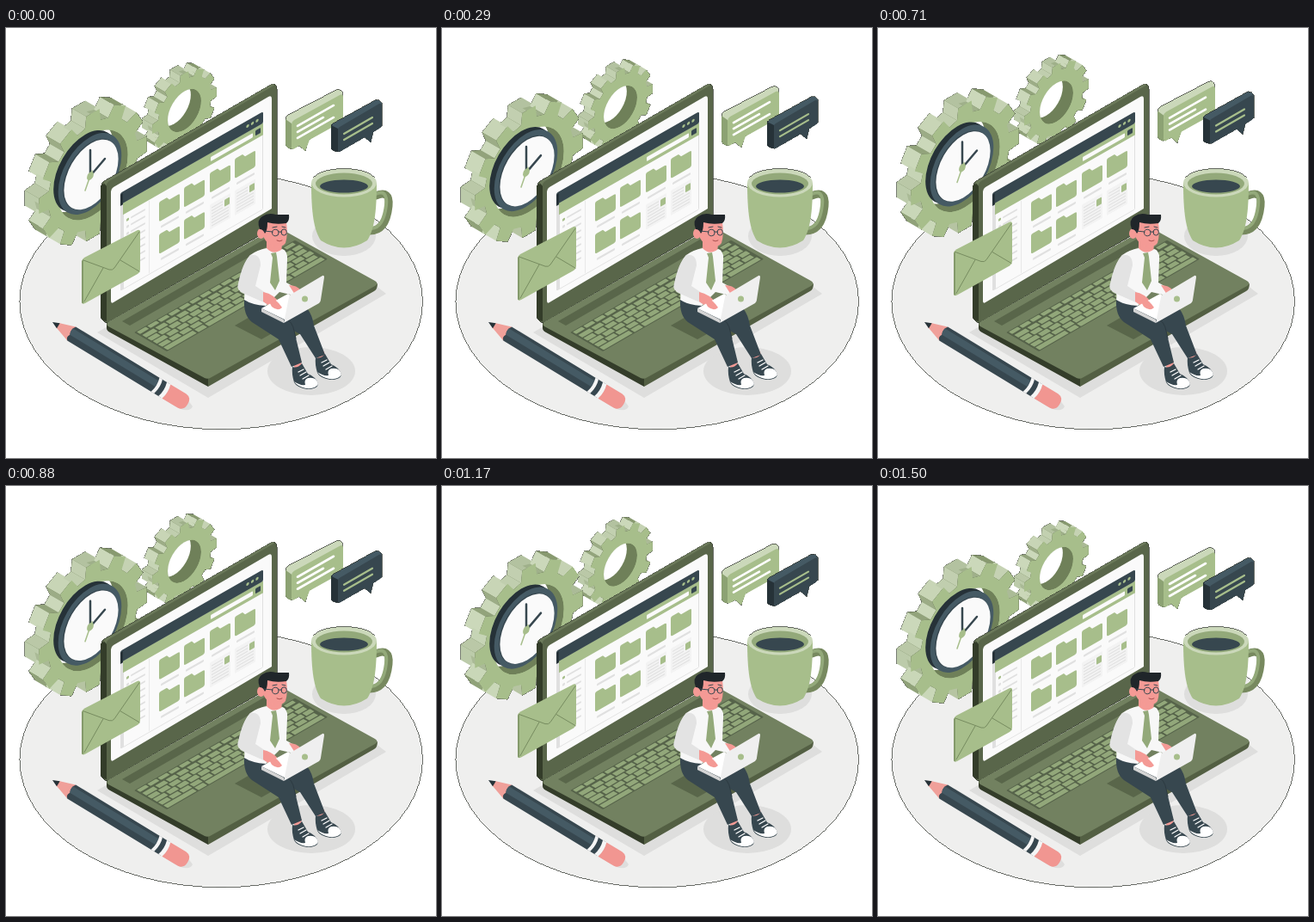
These frames come from a looping animation (500 by 500 pixels, 1540 ms). An HTML page:

```html
<!DOCTYPE html>
<html lang="en">
<head>
<meta charset="utf-8">
<title>Workspace</title>
<style>
  html, body { margin: 0; width: 100%; height: 100%; overflow: hidden; background: #fff }
  svg { display: block; width: 100vw; height: 100vh }
  .edge { stroke: #2b3028; stroke-width: .7; shape-rendering: crispEdges }
  .line { fill: none; stroke-linecap: round; stroke-linejoin: round }
</style>
</head>
<body>
<svg viewBox="0 0 500 500">
  <ellipse class="edge" cx="250.200" cy="318" rx="234.300" ry="148.700" fill="#efefee"/>

  <!-- shadows -->
  <g fill="#dededd">
    <path d="M106 354L235 430 442 309 420 292 130 340Z"/>
    <ellipse cx="393" cy="242" rx="37" ry="23"/>
    <ellipse cx="355" cy="399" rx="51" ry="28"/>
    <path d="M70 363L192 437Q212 450 217 440L205 424 90 352Z"/>
  </g>

  <g class="float">
    <g id="gears"></g>
    <g id="clock"></g>
  </g>

  <!-- laptop lid -->
  <path class="edge" fill="#59664a" d="M110 186Q110 181 114 178L306 67Q315 62 315 71V230L117 343Q110 340 110 334Z"/>
  <path fill="#333c29" d="M110 184Q112 180 117 182V341Q110 340 110 334Z"/>
  <path fill="#6b795a" d="M113 179L306 67Q310 64 313 66L120 178Q116 181 117 184Z"/>
  <path fill="#fafafa" d="M122 190Q122 187 125 185L305 80Q309 78 309 82V210L125 319Q122 321 122 317Z"/>
  <g id="screen" transform="matrix(1 -.571 0 1 133 192)"></g>

  <!-- laptop base -->
  <path fill="#343d2a" d="M117 342V349Q117 352 121 354L235 417V405Z"/>
  <path fill="#535f43" d="M235 405V417L428 306Q432 304 432 297Z"/>
  <path fill="#728160" d="M120 341L315 231 429 294Q434 297 429 300L239 406Q235 409 231 407L119 347Q115 344 120 341Z"/>
  <path fill="#59664a" d="M135 341L312 239 321 244 144 346Z"/>
  <path fill="#59664a" d="M266 346L292 331 322 348 297 362Z"/>
  <g id="keys" transform="matrix(1 -.574 1 .579 149 354)"></g>

  <!-- mug -->
  <path class="line" d="M430 195Q447 188 445 207Q442 236 423 236" stroke="#77895f" stroke-width="9"/>
  <path class="line" d="M430 193Q444 187 442 206Q439 232 425 233" stroke="#93a97a" stroke-width="4"/>
  <path fill="#a7be8b" d="M355 180C355 215 358 235 366 247Q393 264 420 247C428 235 431 215 431 180Z"/>
  <ellipse cx="393" cy="180" rx="38" ry="16.500" fill="#cbd8ba"/>
  <ellipse cx="393" cy="181" rx="33" ry="12.500" fill="#93a97a"/>
  <ellipse cx="393" cy="184" rx="28" ry="7.500" fill="#37474f"/>
  <path class="edge" fill="none" d="M357 174Q367 163.500 393 163.500T429 174"/>

  <!-- pencil -->
  <g transform="translate(54 342) rotate(31.3)">
    <path fill="#f0a09a" d="M7-3L26-9.500V9.500L7 3Z"/>
    <path fill="#263238" d="M0 0L8-3.500V3.500Z"/>
    <path fill="#37474f" d="M26-9.500H154V9.500H26Q22 6 25 2Q22-4 26-9.500Z"/>
    <path fill="#455a64" d="M24-6H141V2H25Q23-2 24-6Z"/>
    <path fill="#f5f5f5" d="M140-9.500h4q3 9 0 19h-4q3-9 0-19Zm10 0h5q3 9 0 19h-5q3-9 0-19Z"/>
    <path fill="#f19691" d="M155-9.500H176Q184-9 184 0T176 9.500H155Q158 0 155-9.500Z"/>
  </g>

  <!-- man -->
  <g>
    <path fill="#f49a95" d="M334 388l9-3 1 10-8 3ZM361 379l9-3 1 8-8 3Z"/>
    <g id="shoe">
      <path fill="#37474f" d="M333 394Q339 396 344 390L351 402Q361 406 363 414Q362 420 350 420Q338 418 335 412Q332 402 333 394Z"/>
      <path fill="#fff" d="M351 407Q361 405 363 414Q360 420 349 419Q339 417 335 411Q342 416 348 415Q346 409 351 407Z"/>
      <path class="line" stroke="#fff" stroke-width="1.300" d="M340 400l6-3M342 404l7-4M345 408l7-4"/>
    </g>
    <use href="#shoe" x="27" y="-11"/>
    <path fill="#37474f" d="M318 343L350 326Q356 333 358 346L371 380 360 384 342 356Z"/>
    <path fill="#37474f" d="M277 316L300 321 328 338Q333 342 335 352L344 389 332 394 317 362 286 342Q276 334 277 316Z"/>
    <path class="line" stroke="#2c3a41" d="M326 338Q333 342 335 352L337 361"/>
    <path fill="#f49a95" d="M303 246L321 250 320 263Q312 268 303 261Z"/>
    <path fill="#f7f7f7" d="M284 264Q292 258 303 256Q311 265 321 257Q328 259 327 270L326 296 342 305 335 311 318 307 302 323Q286 322 277 316Q279 303 271 300Q275 274 284 264Z"/>
    <path fill="#e3e3e3" d="M284 264Q296 262 296 276L290 300 308 312 302 320 277 309Q267 305 270 297Q275 273 284 264Z"/>
    <path fill="#93a97a" d="M308 262L314 261 315 266 318 294 313 305 307 296 310 267Z"/>
    <path fill="#f49a95" d="M299 307Q312 309 322 324Q321 330 313 328L299 318ZM329 299Q338 299 343 305L336 310Z"/>
    <path fill="#f49a95" d="M300 226Q311 220 326 226Q328 240 325 250Q320 257 309 253Q303 250 300 244Z"/>
    <ellipse cx="296.500" cy="239" rx="4.500" ry="6" fill="#f49a95"/>
    <path fill="#20262a" d="M295 234Q291 223 298 219Q305 214 314 217L329 217Q330 224 326 227Q314 229 304 226Q304 236 301 239Q299 234 295 234Z"/>
    <path class="line" stroke="#37474f" d="M300 236L310 237M317 237L320 237M309.500 238a3.800 3.800 0 1 0 7.600 0a3.800 3.800 0 1 0-7.600 0M320 237.500a3.200 3.600 0 1 0 6.400 0a3.200 3.600 0 1 0-6.400 0M310 232l5-1M321 231l4 1"/>
    <path class="line" stroke="#a84f4f" d="M315 247q3 2 6 0"/>
    <path fill="#fff" d="M297 326L328 309 344 320 326 340Z"/>
    <path fill="#f49a95" d="M302 311Q314 314 321 325Q316 330 309 324Z"/>
    <path fill="#d5d5d5" d="M297 326L323 339V343L297 330Z"/>
    <path fill="#efefef" d="M329 313Q329 311 331 310L368 288Q370 287 370 290L366 316Q366 318 364 320L323 343Z"/>
    <circle cx="347.500" cy="315" r="3.500" fill="#a7be8b"/>
  </g>

  <!-- envelope -->
  <g class="float">
    <path fill="#a7be8b" d="M88 272Q88 269 91 267L153 235Q156 234 156 237V281Q156 284 153 286L92 320Q88 322 88 318Z"/>
    <path fill="#849a6b" d="M88 271L90 269V320Q88 321 88 318Z"/>
    <path class="line" stroke="#778c60" d="M90 270L120 281Q124 282 126 279L155 237M91 318L113 279M133 270L155 283"/>
  </g>

  <!-- speech bubbles -->
  <g class="float">
    <path class="edge" fill="#cbd8ba" d="M325 107Q325 103 328 101L384 72Q388 70 391 74V106L352 130 348 143 341 137 331 141Q325 139 325 135Z"/>
    <path fill="#8ca273" d="M325 106L332 111V141Q325 139 325 135Z"/>
    <path fill="#a7be8b" d="M332 112Q332 109 335 107L388 78Q392 76 392 80V105Q392 108 389 110L353 130 348 143 341 137 334 141Q332 141 332 138Z"/>
    <path class="line" stroke="#fff" stroke-width="2.600" d="M339 114L381 90M339 121L369 104M339 128L381 104"/>
    <path class="edge" fill="#455a64" d="M378 114Q378 112 380 111L429 84Q432 82 437 87V114L427 121 424 133 417 127 387 144Q379 143 378 140Z"/>
    <path fill="#263238" d="M378 113L386 117V144Q379 143 378 140Z"/>
    <path fill="#37474f" d="M386 118Q386 116 388 115L434 88Q437 87 437 90V112Q437 115 434 117L427 121 424 133 417 127 388 144Q386 144 386 142Z"/>
    <path class="line" stroke="#a7be8b" stroke-width="2.200" d="M393 123L426 104M393 130L426 111"/>
  </g>
</svg>

<script>
const LIGHT = [203, 216, 186], DARK = [126, 145, 101];
const FACE = "#a7be8b", WALL = "#6f8059", NAVY = "#37474f", GREY = "#e0e0e0";
const byId = id => document.getElementById(id);
const rect = (x, y, w, h, fill, r = 0) =>
  `<rect x="${x}" y="${y}" width="${w}" height="${h}" rx="${r}" fill="${fill}"/>`;
const repeat = (n, draw) => Array.from({ length: n }, (_, i) => draw(i)).join("");
const disc = (cx, cy, r, fill) =>
  `<circle r="${r}" fill="${fill}" transform="matrix(.866 -.5 0 1 ${cx} ${cy})"/>`;
const poly = (pts, attrs) => `<path d="M${pts.map(p => p.map(v => v.toFixed(1))).join("L")}Z" ${attrs}/>`;

// Twelve-toothed wheel, extruded towards the upper left
function gear(id, cx, cy, tip, root, hole, depth) {
  const dx = -depth * .866, dy = -depth * .5;
  const shift = ([x, y]) => [x + dx, y + dy];
  const pts = [];
  for (let tooth = 0; tooth < 12; tooth++)
    for (const [a, r] of [[-10, root], [-7, tip], [7, tip], [10, root]]) {
      const t = (tooth * 30 + a) * Math.PI / 180, u = r * Math.cos(t);
      pts.push([cx + .866 * u, cy + r * Math.sin(t) - .5 * u]);
    }
  const sides = pts.map((p, i) => {
    const q = pts[(i + 1) % pts.length], ex = q[0] - p[0], ey = q[1] - p[1];
    if (ey * dx - ex * dy <= 0) return null;
    const lit = Math.max(0, (-.9 * ey + .44 * ex) / Math.hypot(ex, ey)) ** 2;
    const rgb = DARK.map((d, k) => Math.round(d + (LIGHT[k] - d) * lit));
    return { depth: p[0] + q[0] + p[1] + q[1], svg: poly([p, q, shift(q), shift(p)], `fill="rgb(${rgb})"`) };
  }).filter(Boolean).sort((a, b) => a.depth - b.depth).map(side => side.svg).join("");
  return poly(pts.map(shift), `class="edge" fill="${WALL}"`) +
    poly(pts, `class="edge" fill="${FACE}"`) + sides + poly(pts, `fill="${FACE}"`) +
    `<clipPath id="${id}">${disc(cx, cy, hole, "#000")}</clipPath>` +
    `<g clip-path="url(#${id})">${disc(cx, cy, hole, WALL)}${disc(cx + dx, cy + dy, hole, "#fff")}</g>`;
}
byId("gears").innerHTML =
  gear("small", 207.5, 96, 43.5, 36, 22.5, 14) + gear("large", 101, 171, 73, 60, 47, 19);

byId("clock").innerHTML =
  disc(92, 166.5, 42.5, "#263238") + disc(97.5, 169.5, 42.5, "#455a64") + disc(98, 170, 37, NAVY) +
  disc(99, 170.5, 36.5, "#fafafa") +
  `<g class="line"><path stroke="${NAVY}" stroke-width="2.5" d="M98 142L98 172L115 152"/>
   <path stroke="${FACE}" stroke-width="1.5" d="M100 166L92 189"/></g>` + disc(98, 172, 4.5, FACE);

const folder = (x, y) =>
  `<path fill="${FACE}" d="M${x} ${y + 2}q0-2 2-2h7l3 4h10q2 0 2 2v15q0 2-2 2h-20q-2 0-2-2Z"/>` +
  rect(x + 2, y + 29, 21, 2.5, GREY, 1);
const sheet = (x, y) =>
  rect(x, y, 24, 29, "#f3f3f3", 1) +
  repeat(7, i => rect(x + 2, y + 4 + i * 3.5, i < 3 ? 13 : 20, 1.2, GREY)) +
  rect(x + 17, y + 4, 6, 8, FACE, 1);

byId("screen").innerHTML =
  rect(0, 2, 166, 112, GREY, 2) + rect(4, 12, 161, 101, "#fafafa") +
  rect(3, 13, 163, 14, FACE) + rect(0, 0, 166, 13.5, NAVY, 2) + rect(0, 2, 3, 13, "#263238") +
  repeat(3, i => `<circle cx="${148 + i * 5.5}" cy="6.5" r="1.7" fill="${FACE}"/>`) +
  rect(105, 18, 49, 5, "#fafafa", 1) + rect(157, 17, 6, 6, NAVY, 1) +
  rect(33, 28, 1, 84, "#e8e8e8") +
  repeat(8, i => rect(7, 34 + i * 8, 3, 3, i ? GREY : FACE, 1) + rect(12, 34.5 + i * 8, 17, 2, GREY, 1)) +
  [45, 74, 104, 133].map((x, i) => folder(x, 36) + (i < 2 ? folder(x, 73.5) : sheet(x, 73))).join("");

byId("keys").innerHTML = rect(0, 0, 187, 38, "#56634a", 1) +
  repeat(6, row => {
    const y = 1 + row * 6.2, h = row ? 5 : 4;
    if (row == 5) return [[2, 34], [38, 10], [50, 62], [114, 10], [126, 10], [138, 10], [150, 35]]
      .map(([x, w]) => rect(x, y, w, h, "#92a77a", .6)).join("");
    return repeat(15, i => rect(2 + i * 12.2 + (i && row % 2 ? 3 : 0), y,
      i == 0 && row % 2 ? 13.2 : i == 14 && row % 2 ? 9 : 10.4, h, "#92a77a", .6));
  });

// Floating parts rise and sink by 10 units at an even speed
const LOOP = 1540, PERIOD = 1500, RISE = 10;
const floats = document.querySelectorAll(".float");
function frame() {
  const t = Math.min(performance.now() % LOOP, PERIOD) / PERIOD;
  const y = -RISE * (1 - Math.abs(1 - 2 * t));
  floats.forEach(g => g.setAttribute("transform", `translate(0 ${y.toFixed(2)})`));
  requestAnimationFrame(frame);
}
frame();
</script>
</body>
</html>
```
